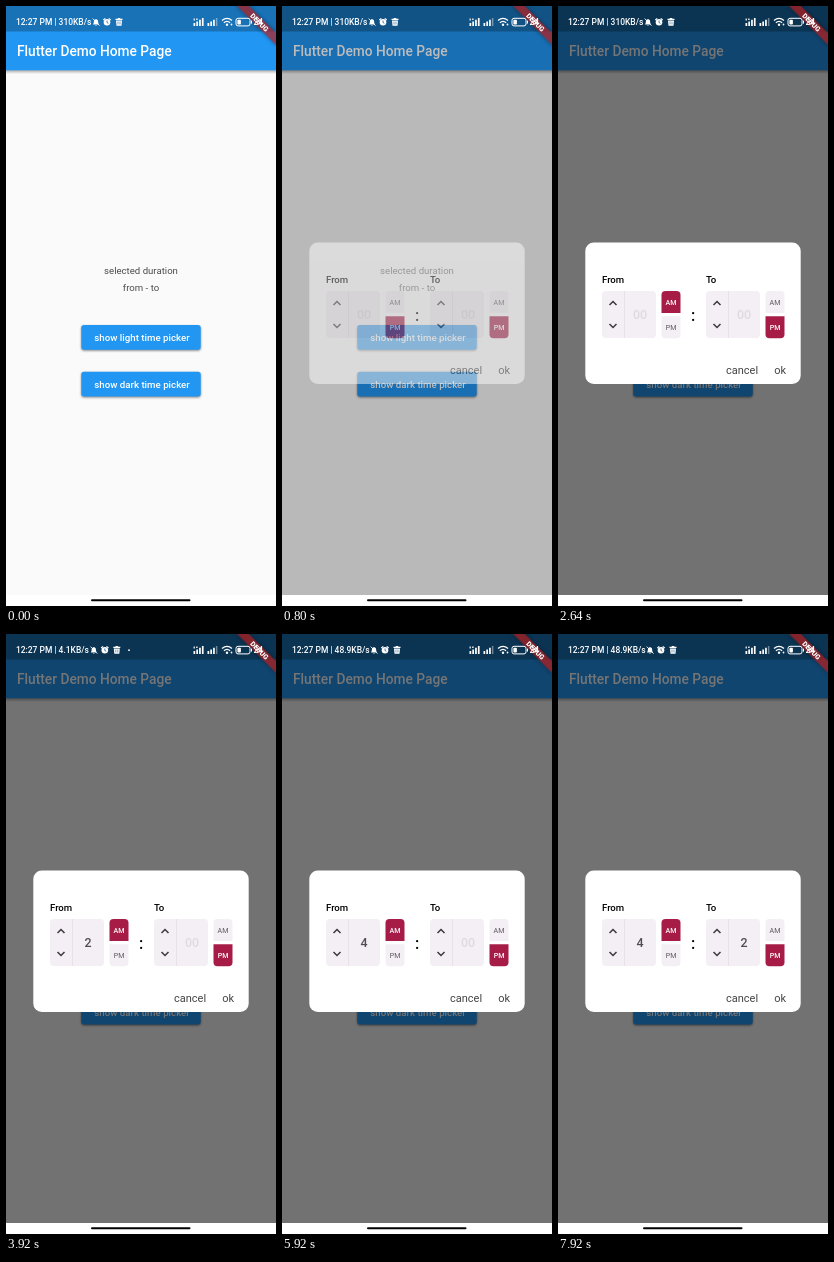
Recreate the animation shown at these times as an HTML page. Size 270 px wide and 600 px high, loop 8 s.

```html
<!DOCTYPE html>
<html lang="en">
<head>
<meta charset="utf-8">
<title>Time picker demo</title>
<style>
  html, body { margin: 0; width: 100%; height: 100%; overflow: hidden; background: #fafafa; }
  svg { display: block; width: 270px; height: 600px; font-family: Roboto, "Open Sans", sans-serif; }
  .mid { text-anchor: middle; }
  .med { font-weight: 500; }
  .body { font-size: 9.62px; }
  .button rect { fill: #2196f3; filter: drop-shadow(0 1px 1px #0007); }
  .button text { fill: #fff; font-size: 9.7px; }
  .status { font-size: 8.45px; fill: #fff; }
  .field { fill: #f3eff4; }
  .chevron { fill: none; stroke: #3c383d; stroke-width: 1.5; }
  .number { font-size: 12.4px; font-weight: 500; }
  .half { font-size: 7.1px; }
  .action { font-size: 11px; fill: #444; }
</style>
</head>
<body>
<svg viewBox="0 0 270 600">
  <defs>
    <linearGradient id="drop" x2="0" y2="1">
      <stop stop-color="#000" stop-opacity=".32"/>
      <stop offset="1" stop-color="#000" stop-opacity="0"/>
    </linearGradient>
    <clipPath id="app"><rect width="270" height="589"/></clipPath>
    <g id="arrows" class="chevron">
      <path d="M7.5 14l3.5-3.5 3.5 3.5"/>
      <path d="M7.5 33l3.5 3.5 3.5-3.5"/>
    </g>
  </defs>

  <g id="page">
    <rect width="270" height="600" fill="#fafafa"/>
    <rect y="64" width="270" height="4" fill="url(#drop)"/>
    <rect width="270" height="64.3" fill="#2196f3"/>
    <rect width="270" height="25.5" fill="#000" opacity=".25"/>
    <text class="med" x="11" y="50" font-size="13.74" fill="#fff">Flutter Demo Home Page</text>
    <g class="body mid" fill="#4c4c4c">
      <text x="135" y="267.6">selected duration</text>
      <text x="135" y="285.4">from - to</text>
    </g>
    <g class="button mid med">
      <rect x="75.3" y="319" width="119.4" height="24.7" rx="2.7"/>
      <text x="136" y="334.9">show light time picker</text>
      <rect x="75.3" y="365.8" width="119.4" height="24.7" rx="2.7"/>
      <text x="136" y="381.7">show dark time picker</text>
    </g>
  </g>

  <rect id="scrim" width="270" height="589"/>

  <g id="dialog">
    <rect x="27.3" y="236.4" width="215.4" height="141.6" rx="8.5" fill="#fff"/>
    <g id="from" transform="translate(44 285)"></g>
    <g id="to" transform="translate(148 285)"></g>
    <text class="mid med" x="135" y="315" font-size="16">:</text>
    <text class="action" x="168" y="368">cancel</text>
    <text class="action" x="216.3" y="368">ok</text>
  </g>

  <g clip-path="url(#app)">
    <g transform="translate(270 0) rotate(45)">
      <rect x="-28" y="19.2" width="56" height="8.3" fill="#b71c1c" opacity=".7" style="filter: drop-shadow(0 0 2px #0008)"/>
      <text class="mid" y="25.8" font-size="7" font-weight="900" fill="#fff">DEBUG</text>
    </g>
  </g>

  <g class="status med">
    <text id="speed" x="10" y="19"></text>
    <g id="icons">
      <path d="M87 18.5c1-1 .7-2.500 1-3.700 .5-2 3.500-2 4 0 .3 1.200 0 2.700 1 3.700zM89 19.200h2l-1 .9z"/>
      <path d="M86.700 12.600l6.800 7" stroke="#fff" stroke-width=".9"/>
      <circle cx="101" cy="16.300" r="3.300"/>
      <path d="M97.300 14l2-1.700M104.700 14l-2-1.700" stroke="#fff" stroke-width="1.100"/>
      <path class="hands" d="M101 14.500v2l1.400.8" fill="none" stroke="#1f5f96" stroke-width=".8"/>
      <path d="M109.500 12.800h2l.5-.8h2l.5.800h2v1.100h-7zM110 14.500h6l-.5 5.200h-5z"/>
      <path class="hands" d="M112 15.500v3M114 15.500v3" stroke="#1f5f96" stroke-width=".6"/>
    </g>
    <circle id="dot" cx="123" cy="16.200" r=".9"/>
    <g>
      <path d="M187.500 17h1.700v3h-1.700zM190.300 15.500h1.700v4.500h-1.700zM193.100 13.700h1.700v6.300h-1.700zM195.900 12h1.700v8h-1.700z"/>
      <path d="M187.500 12.500h1.500v2h-1.500zM190 12.500h1.700v1.400h-1.700z" opacity=".8"/>
      <path d="M201.500 17h1.700v3h-1.700zM204.300 15.500h1.700v4.500h-1.700zM207.100 13.700h1.700v6.300h-1.700z"/>
      <path d="M209.900 12h1.500v8h-1.500z" opacity=".4"/>
    </g>
    <g fill="none" stroke="#fff" stroke-width="1.300">
      <path d="M216 14.500q5-4.300 10 0M217.900 16.700q3.100-2.700 6.200 0"/>
      <rect x="230" y="12.300" width="14" height="7.600" rx="2" stroke-width="1"/>
    </g>
    <circle cx="221" cy="18.800" r="1.200"/>
    <circle cx="225.500" cy="18.500" r=".9"/>
    <rect x="231.400" y="13.700" width="3.500" height="4.800" rx=".8"/>
    <rect x="245" y="14.600" width="1" height="3"/>
    <text x="247.500" y="19">24</text>
  </g>

  <rect y="589" width="270" height="11" fill="#fff"/>
  <rect x="85" y="593.300" width="99.500" height="2" rx="1"/>
</svg>
<script>
  const LOOP = 8000;
  const OPEN = 770, FADE = 110;
  const $ = id => document.getElementById(id);

  const speeds = [[0, '310KB/s', 0], [2800, '4.1KB/s', -2.2], [5800, '48.9KB/s', 2]];
  const fromHours = [[0, '00'], [2880, '1'], [3440, '2'], [4240, '3'], [4800, '4']];
  const toHours = [[0, '00'], [6080, '1'], [7200, '2']];
  const fromHalf = [[0, 'PM'], [2080, 'AM']];
  const toHalf = [[0, 'PM']];

  const at = (steps, t) => steps.filter(s => s[0] <= t).pop();

  function buildPicker(id, label) {
    const g = $(id);
    g.innerHTML = `
      <text class="body med" y="-8.300">${label}</text>
      <rect class="field" width="54" height="47" rx="4"/>
      <path d="M22.500 0v47" stroke="#e5dfe5" stroke-width=".8"/>
      <use href="#arrows"/>
      <text class="number mid" x="38" y="28"></text>
      <path class="half-box" d="M59.500 22V4q0-4 4-4h11q4 0 4 4v18z"/>
      <text class="half mid" x="69" y="13.600">AM</text>
      <path class="half-box" d="M59.500 25.300v18q0 4 4 4h11q4 0 4-4v-18z"/>
      <text class="half mid" x="69" y="38.800">PM</text>`;
    const number = g.querySelector('.number');
    const boxes = g.querySelectorAll('.half-box');
    const halves = g.querySelectorAll('.half');
    return (hour, half) => {
      number.textContent = hour;
      number.setAttribute('fill', hour === '00' ? '#dfdae0' : '#504c51');
      halves.forEach((text, i) => {
        const on = text.textContent === half;
        boxes[i].setAttribute('fill', on ? '#a71c47' : '#f3eff4');
        text.setAttribute('fill', on ? '#fff' : '#5a565b');
        text.setAttribute('font-weight', on ? 500 : 400);
      });
    };
  }

  const setFrom = buildPicker('from', 'From');
  const setTo = buildPicker('to', 'To');

  function draw(t) {
    const p = Math.min(1, Math.max(0, (t - OPEN) / FADE));
    const shown = 1 - (1 - p) ** 2;
    $('scrim').setAttribute('opacity', 0.54 * shown);
    $('dialog').setAttribute('opacity', shown);

    const [, speed, shift] = at(speeds, t);
    $('speed').textContent = `12:27 PM | ${speed}`;
    $('icons').setAttribute('transform', `translate(${shift} 0)`);
    $('dot').setAttribute('opacity', shift < 0 ? 1 : 0);

    setFrom(at(fromHours, t)[1], at(fromHalf, t)[1]);
    setTo(at(toHours, t)[1], at(toHalf, t)[1]);
  }

  const start = performance.now();
  function tick() {
    draw((performance.now() - start) % LOOP);
    requestAnimationFrame(tick);
  }
  tick();
</script>
</body>
</html>
```
